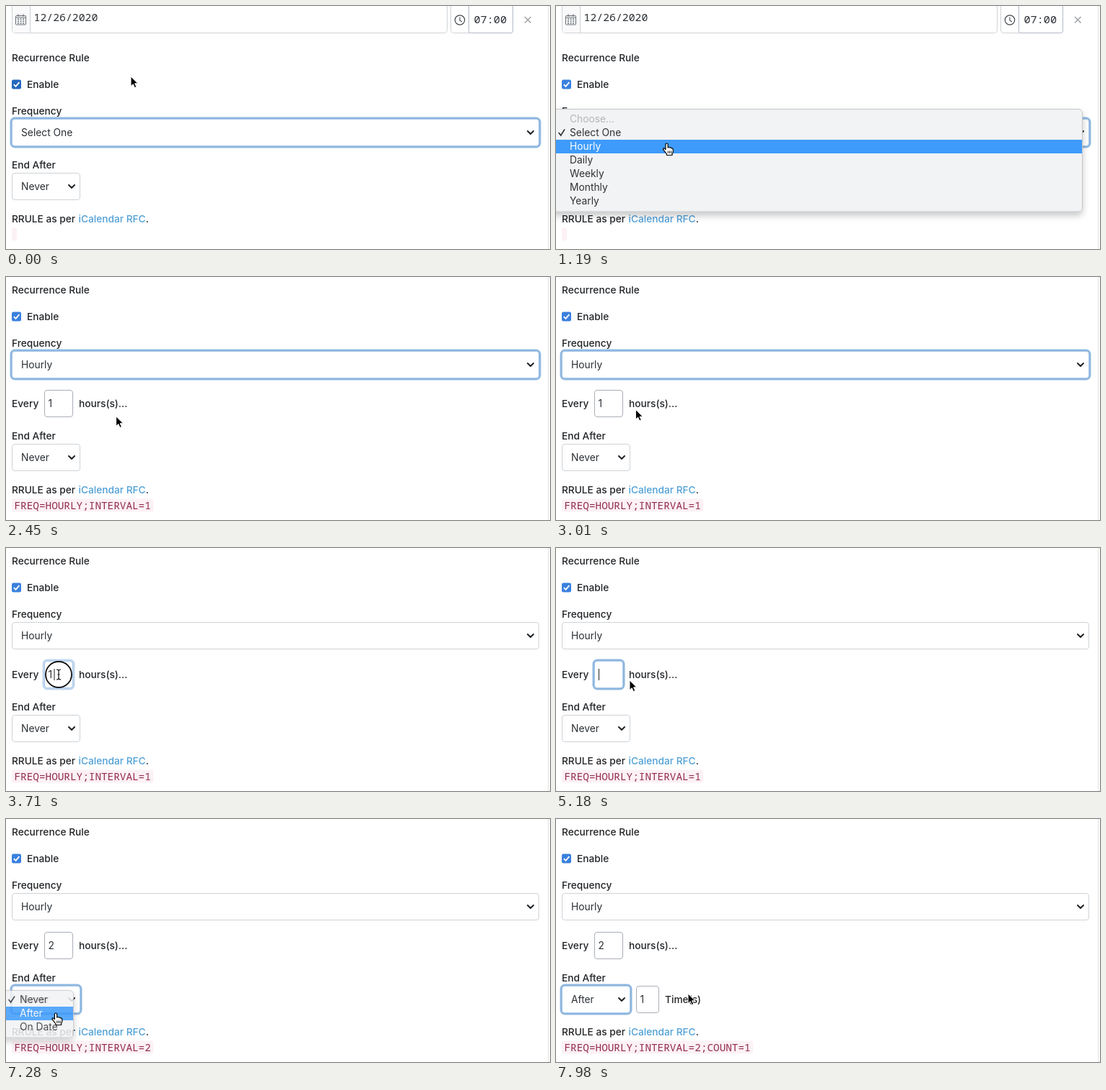
Write an HTML page that moves like this. It is 754 by 338 pixels and loops after 8000 ms.

```html
<!DOCTYPE html>
<html lang="en">
<head>
<meta charset="utf-8">
<title>Recurrence rule form</title>
<style>
  html, body { margin: 0; width: 100%; height: 100%; overflow: hidden; background: #fff; }
  svg { display: block; width: 754px; height: 338px; }
  text { font: 400 13.8px Inter, "Open Sans", sans-serif; fill: #2b3035; white-space: pre; }
  .label { font-weight: 500; font-size: 13.7px; fill: #212427; }
  .link { fill: #4e9fd6; }
  .mono { font: 400 14.8px "Noto Sans Mono", "DejaVu Sans Mono", monospace; }
  .code { font: 400 14.35px "Noto Sans Mono", "DejaVu Sans Mono", monospace; fill: #942d52; }
</style>
</head>
<body>
<svg id="stage" viewBox="0 0 754 338">
  <defs>
    <filter id="shade" x="-10%" y="-20%" width="120%" height="150%">
      <feDropShadow dx="0" dy="5" stdDeviation="5" flood-color="#000" flood-opacity=".22"/>
    </filter>
  </defs>
  <g id="view"></g>
</svg>
<script>
const LOOP = 8000, STEP = 70;
const SCROLL_AT = 1820, INPUT_AT = 3640, EMPTY_AT = 5110, TYPED_AT = 5250,
      RULE_AT = 5320, END_AT = 6160, COUNT_AT = 7420;
const view = document.getElementById('view');

// time, x, y of the pointer tip
const path = [
  [0, 173, 98], [420, 155, 176], [840, 155, 176], [1120, 153.5, 191],
  [1190, 153.5, 191], [1330, 153, 194], [2400, 153, 194], [3570, 73, 176],
  [3920, 73, 176], [4270, 102, 184], [5670, 102, 184], [6090, 69, 251],
  [6510, 69, 251], [6790, 69, 270], [7420, 69, 270], [7980, 183, 243]
];
const clicks = [490, 1330, INPUT_AT, END_AT, 6930];
const menus = [
  { open: 560, flash: 1540, fade: 1610, top: 143, first: 157, right: 729.5, checked: 1, pick: 2,
    items: ['Choose...', 'Select One', 'Hourly', 'Daily', 'Weekly', 'Monthly', 'Yearly'] },
  { open: 6230, flash: 7140, fade: 7210, top: 238, first: 251, right: 93.5, checked: 0, pick: 1,
    items: ['Never', 'After', 'On Date'] }
];

const during = (t, a, b) => t >= a && t < b;
const text = (x, y, s, cls = '', more = '') =>
  `<text x="${x}" y="${y + 5}" class="${cls}" ${more}>${s}</text>`;
const rect = (x, y, w, h, r, fill, stroke = 'none', more = '') =>
  `<rect x="${x}" y="${y}" width="${w}" height="${h}" rx="${r}" fill="${fill}" stroke="${stroke}" ${more}/>`;
const line = (d, color, width, more = '') =>
  `<path d="${d}" fill="none" stroke="${color}" stroke-width="${width}" ${more}/>`;

function box(x, y, w, border, glow = 0) {
  const ring = glow ? rect(x - 1, y - 1, w + 2, 39, 5, 'none', '#8fb7e0', `stroke-width="4" opacity="${glow}"`) : '';
  return ring + rect(x, y, w, 37, 3.5, '#fff', glow ? '#a9c9ea' : border);
}

function select(x, y, w, value, glow) {
  return box(x, y, w, '#ced3d8', glow) + text(x + 12.5, y + 18.5, value) +
    line(`M${x + w - 15.5} ${y + 16.5}l4 4 4-4`, '#1f2327', 2, 'stroke-linecap="round" stroke-linejoin="round"');
}

function glowAt(t, from, to) {
  return during(t, from, to) ? Math.min(1, .55 + (t - from - 70) / 150) : 0;
}

function pointer(t) {
  let i = path.length - 1;
  while (path[i][0] > t) i--;
  const [t0, x0, y0] = path[i], [t1, x1, y1] = path[i + 1] || [LOOP, x0, y0];
  const k = (t - t0) / (t1 - t0), e = k * k * (3 - 2 * k);
  return { x: x0 + (x1 - x0) * e, y: y0 + (y1 - y0) * e };
}

function dateRow() {
  let dots = '';
  for (let i = 0; i < 9; i++) dots += rect(16 + i % 3 * 3.6, 17.5 + (i / 3 | 0) * 2.8, 2, 1.5, 0, '#666c72');
  return rect(8.5, -4.5, 603, 42, 4, '#fff', '#ced3d8') +
    rect(9, -4, 24, 41, 3, '#fafafb') + line('M33.5 0V37', '#ced3d8', 1) +
    rect(13.5, 13.5, 14, 12.5, 1, 'none', '#666c72') +
    line('M13.5 16H27.5M17 11.5v3M24 11.5v3', '#666c72', 1.2) + dots +
    text(38.5, 16, '12/26/2020', 'mono') +
    rect(616.5, -4.5, 86, 42, 4, '#fff', '#ced3d8') +
    rect(641.5, -4.5, 61, 42, 3, '#fff', '#b3b9c6') +
    '<circle cx="629" cy="19.500" r="6.700" fill="none" stroke="#44494e" stroke-width="1.200"/>' +
    line('M629 15.500v4.500l3 2', '#44494e', 1.1) +
    text(648.5, 19, '07:00', 'mono', 'style="font-size:15.2px"') +
    line('M719 15l8.500 8.500m0-8.500l-8.500 8.500', '#a3a6a9', 1.6);
}

function form(t) {
  const moved = t >= SCROLL_AT, dy = moved ? 0 : 54;
  const every = t < EMPTY_AT ? '1' : t < TYPED_AT ? '' : '2';
  const counted = t >= COUNT_AT;
  let s = moved ? '' : dateRow();
  s += text(8, 18 + dy, 'Recurrence Rule', 'label') +
    rect(8, 48.5 + dy, 13, 13, 2.2, t < 70 ? '#2468bd' : '#3a80de') +
    line(`M10.800 ${55.2 + dy}l2.700 2.700 4.900-5.800`, '#fff', 1.8) +
    text(29, 55 + dy, 'Enable', 'label') +
    text(8, 92 + dy, 'Frequency', 'label') +
    select(8.5, 103.5 + dy, 730, moved ? 'Hourly' : 'Select One', t < INPUT_AT ? 1 : 0);
  if (moved) {
    s += text(8, 176, 'Every', 'label') +
      box(53.5, 157.5, 39, '#a9afb6', glowAt(t, INPUT_AT, END_AT)) +
      text(58.5, 176, every) + text(101, 176, 'hours(s)...', 'label');
    if (during(t, INPUT_AT, 4270) || during(t, 4760, 5740))
      s += rect(every === '1' ? 66.5 : every ? 68 : 59, 168, 1, 16, 0, '#222');
  }
  s += text(8, 221, 'End After', 'label') +
    select(8.5, 232.5, 94, counted ? 'After' : 'Never', glowAt(t, END_AT, LOOP));
  if (counted)
    s += box(111.5, 232.5, 31, '#a9afb6') + text(116.5, 251, '1') + text(151, 251, 'Time(s)', 'label');
  s += text(8, 296, 'RRULE as per', 'label') +
    text(100.5, 296, 'iCalendar RFC<tspan fill="#212427">.</tspan>', 'label link', 'style="fill:#4e9fd6"');
  const rule = moved ? `FREQ=HOURLY;INTERVAL=${t < RULE_AT ? 1 : 2}${counted ? ';COUNT=1' : ''}` : '';
  return s + rect(8, 308.5, rule.length * 8.6 + 7, 18, 3, '#fcf1f4') + text(11.5, 318, rule, 'code');
}

function menu(m, t, p) {
  const alpha = t <= m.fade ? 1 : { 70: .86, 140: .5, 210: .18 }[t - m.fade] || 0;
  if (t < m.open || !alpha) return '';
  const n = m.items.length;
  let hot = Math.floor((p.y - m.first + 9.5) / 19);
  if (t >= m.flash) hot = t < m.fade ? -1 : m.pick;
  let s = rect(-12, m.top + .5, m.right + 12, m.first - m.top + n * 19 - 4.5, 5.5, '#f2f3f4', '#c4c6c9', 'filter="url(#shade)"');
  if (hot >= 0) s += rect(0, m.first - 9 + hot * 19, m.right - .5, 19, 0, '#3e9bfb');
  m.items.forEach((name, i) => {
    const y = m.first + i * 19;
    const color = i === hot ? '#fff' : name === 'Choose...' ? '#b4b6b9' : '#303236';
    s += text(19, y, name, '', `style="fill:${color}"`);
    if (i === m.checked) s += line(`M4 ${y + .5}l2.700 3.500 5-8`, color, 1.6, 'stroke-linecap="round"');
  });
  return `<g opacity="${alpha}">${s}</g>`;
}

const arrow = '<path d="M0 0V13.600L3.200 10.700 5.400 15.600 7.800 14.500 5.600 9.800H9.900Z" fill="#000" stroke="#fff" stroke-width="1"/>';
const beam = line('M-3-7Q0-7 0-5Q0-7 3-7M0-5V5M-3 7Q0 7 0 5Q0 7 3 7M-1.500 0h3', '#fff', 2.6) +
  line('M-3-7Q0-7 0-5Q0-7 3-7M0-5V5M-3 7Q0 7 0 5Q0 7 3 7M-1.500 0h3', '#111', 1.2);
const hand = '<path d="M-1.600 1.600Q-1.600 0 0 0Q1.600 0 1.600 1.600V6Q3 5 4.200 6Q5.500 5.400 6.600 6.800Q8.800 6.600 8.800 9V11Q8.600 13.500 7.500 14.500V16.500H0V15Q-2 12.500-4.600 9.200Q-5.600 7.400-4.200 6.900Q-3 6.700-1.600 8.600Z" fill="#fff" stroke="#000" stroke-width="1.200" stroke-linejoin="round"/>' +
  line('M1.800 10.500v3.500M4 10.500v3.500M6.200 10.500v3.500', '#000', .9);

function cursor(t, p) {
  let shape = arrow;
  if (t < 2030 ? p.y > 157 : p.y > 231 && p.x < 104) shape = hand;
  else if (t > 2450 && p.x < 93 && p.y < 195) shape = beam;
  let s = `<g transform="translate(${p.x} ${p.y})">${shape}</g>`;
  const c = clicks.find(at => during(t, at, at + 210));
  if (c !== undefined) {
    const k = (t - c) / STEP;
    s += `<circle cx="${p.x}" cy="${p.y}" r="${5 + 13 * k}" fill="none" stroke="#111" stroke-width="${2.2 - .4 * k}"/>`;
  }
  return s;
}

function draw(t) {
  const p = pointer(t);
  view.innerHTML = rect(0, 0, 754, 338, 0, '#fff') + rect(751, 0, 3, 338, 0, '#fafafa') +
    line('M751.500 0V338', '#e4e5e6', 1) + form(t) +
    menus.map(m => menu(m, t, p)).join('') + cursor(t, p);
}

const start = performance.now();
let last = -1;
function tick() {
  const now = (performance.now() - start) % LOOP;
  const t = Math.floor(now / STEP) * STEP;
  if (t !== last) draw(last = t);
  requestAnimationFrame(tick);
}
tick();
</script>
</body>
</html>
```
